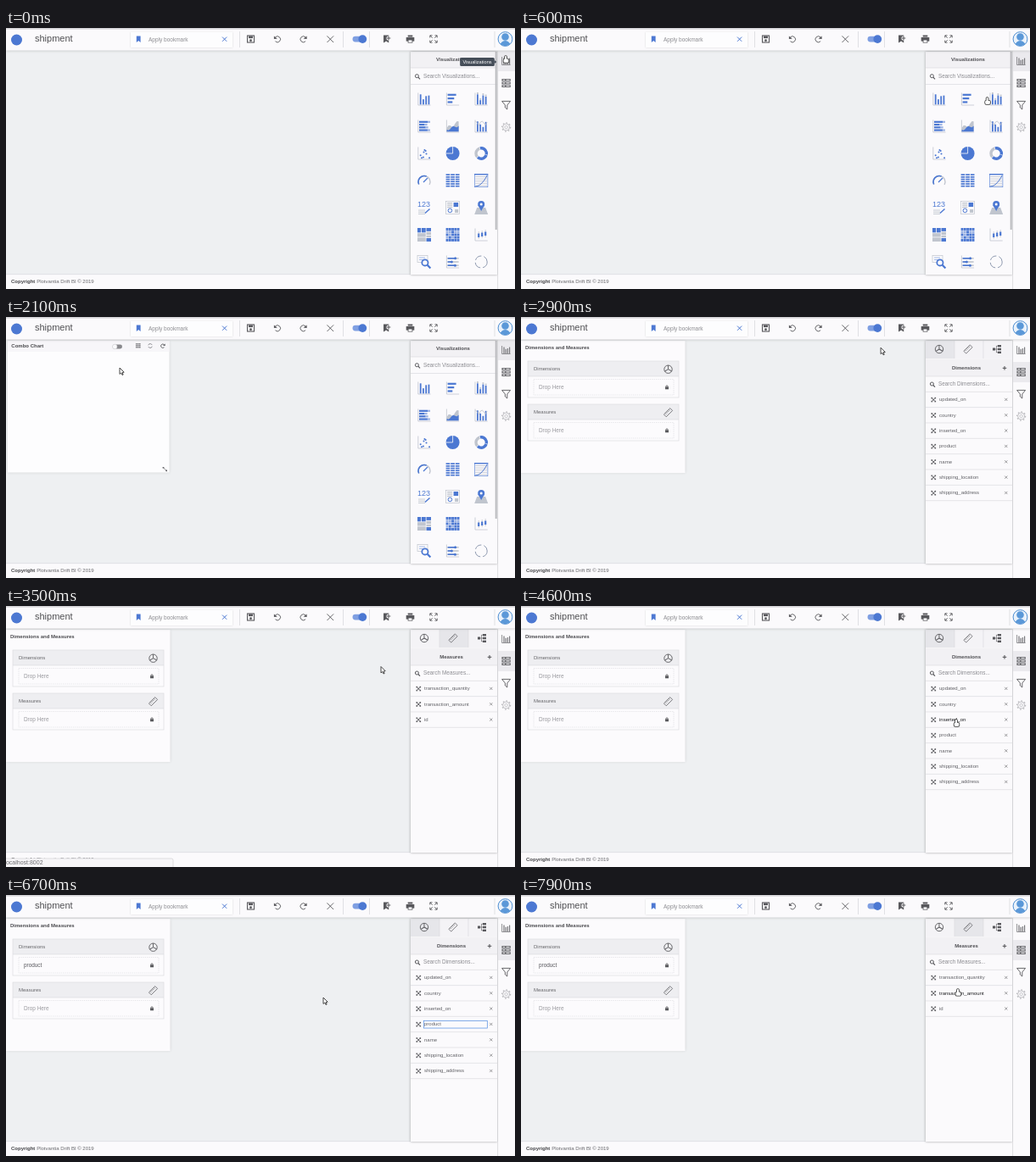
These frames come from a looping animation (600x308 px, 8 s). An HTML page with a canvas:

```html
<!DOCTYPE html>
<html lang="en">
<head>
<meta charset="utf-8">
<title>Dashboard builder</title>
<style>
html, body { margin: 0; width: 600px; height: 308px; overflow: hidden; background: #eef0f2; }
canvas { display: block; width: 600px; height: 308px; }
</style>
</head>
<body>
<canvas id="stage"></canvas>
<script>
const LOOP = 8000, STEP = 100, TAU = Math.PI * 2;
const BLUE = '#4c78d2', PALE = '#9db4e4', GREY = '#c0c5ce', DARK = '#58585c', PAPER = '#fbfafc', EDGE = '#dcdce0';
const FONT = '"Liberation Sans", Arial, sans-serif';
const canvas = document.getElementById('stage');
const g = canvas.getContext('2d');
const dpr = window.devicePixelRatio || 1;
canvas.width = 600 * dpr;
canvas.height = 308 * dpr;

// ---- drawing helpers ----
const each = (n, draw) => { for (let i = 0; i < n; i++) draw(i); };
const noise = n => { const v = Math.sin(n * 12.9898) * 43758.5453; return v - Math.floor(v); };

function rect(color, x, y, w, h) {
  g.fillStyle = color;
  g.fillRect(x, y, w, h);
}
function box(color, x, y, w, h, width = 0.7) {
  g.strokeStyle = color;
  g.lineWidth = width;
  g.strokeRect(x, y, w, h);
}
function dashed(pattern, draw) {
  g.setLineDash(pattern);
  draw();
  g.setLineDash([]);
}
function round(color, x, y, w, h, r) {
  g.fillStyle = color;
  g.beginPath();
  g.roundRect(x, y, w, h, r);
  g.fill();
}
function trace(pts) {
  g.beginPath();
  for (let i = 0; i < pts.length; i += 2) g.lineTo(pts[i], pts[i + 1]);
}
function line(color, width, ...pts) {
  trace(pts);
  g.strokeStyle = color;
  g.lineWidth = width;
  g.stroke();
}
function poly(color, ...pts) {
  trace(pts);
  g.closePath();
  g.fillStyle = color;
  g.fill();
}
function disc(color, x, y, r) {
  g.fillStyle = color;
  g.beginPath();
  g.arc(x, y, r, 0, TAU);
  g.fill();
}
function arc(color, width, x, y, r, from = 0, to = TAU) {
  g.strokeStyle = color;
  g.lineWidth = width;
  g.beginPath();
  g.arc(x, y, r, from, to);
  g.stroke();
}
function text(str, x, y, size, color, bold = false, align = 'left') {
  g.font = `${bold ? 'bold ' : ''}${size}px ${FONT}`;
  g.textAlign = align;
  g.fillStyle = color;
  g.fillText(str, x, y + size * 0.33);
}
function at(x, y, draw, turn = 0, flip = 1) {
  g.save();
  g.translate(x, y);
  g.rotate(turn);
  g.scale(flip, 1);
  draw();
  g.restore();
}
function shadow(color, blur, draw) {
  g.save();
  g.shadowColor = color;
  g.shadowBlur = blur * dpr;
  draw();
  g.restore();
}
function cross(color, x, y, r, w) {
  line(color, w, x - r, y - r, x + r, y + r);
  line(color, w, x + r, y - r, x - r, y + r);
}
const rule = (y, x = 477, end = 579) => line(EDGE, 0.7, x, y, end, y);

// ---- small icons ----
function wheel() {
  arc(DARK, 0.9, 0, 0, 4.7);
  each(3, i => at(0, 0, () => line(DARK, 0.9, 0, 0, 4.7, 0), 0.5 + i * TAU / 3));
}
function ruler() {
  box(DARK, -5.2, -2, 10.4, 4);
  each(4, i => line(DARK, 0.6, i * 2 - 3, -2, i * 2 - 3, 0));
}
function tree() {
  rect(DARK, -5, -1.5, 3, 3);
  line(DARK, 0.6, -0.5, -4, -0.5, 4);
  each(3, i => {
    rect(DARK, 1, i * 3.8 - 5, 4, 2.4);
    line(DARK, 0.6, -2 + (i !== 1) * 1.5, i * 3.8 - 3.8, 1, i * 3.8 - 3.8);
  });
}
function lens(color = DARK) {
  arc(color, 1, -0.6, -0.6, 2);
  line(color, 1.2, 0.9, 0.9, 3, 3);
}
function lock() {
  rect(DARK, -2, -0.4, 4, 3);
  arc(DARK, 0.8, 0, -0.5, 1.3, Math.PI, 0);
}
function turnArrow(r) {
  arc(DARK, 0.9, 0, 0, r, -2.4, 2.4);
  poly(DARK, -r - 0.6, -r - 0.4, -r - 0.6, -0.2, -0.2, -0.5);
}
function node() {
  cross(DARK, 0, 0, 1.9, 0.7);
  each(9, i => { if (i % 2 === 0) rect(DARK, i % 3 * 2 - 2.8, Math.floor(i / 3) * 2 - 2.8, 1.6, 1.6); });
}
function chartIcon() {
  line('#77777b', 0.8, -5, -5, -5, 4.5, 5, 4.5);
  each(4, i => { const h = 3.5 + 4 * wave(i, 1.1); rect('#77777b', i * 2.2 - 3.2, 4 - h, 1.2, h); });
}
function stackIcon() {
  each(3, i => {
    const y = i * 3.6 - 5;
    rect('#6c6c70', -5.2, y, 10.4, 2.8);
    rect(PAPER, -3.8, y + 0.9, 2.2, 0.9);
    rect(PAPER, 0, y + 0.9, 4, 0.9);
  });
}
function filterIcon() {
  line(DARK, 0.9, -5, -4.6, 5, -4.6, 1.2, 0, 1.2, 5, -1.2, 3, -1.2, 0, -5, -4.6);
}
function gearIcon() {
  arc('#bcbcc0', 0.9, 0, 0, 4);
  arc('#bcbcc0', 0.8, 0, 0, 1.7);
  dashed([1.6, 2.2], () => arc('#bcbcc0', 1.3, 0, 0, 5));
}

// ---- gallery icons, each about 16 px around its centre ----
const wave = (i, k) => Math.abs(Math.sin(1.6 + i * k));
const axes = () => line(GREY, 0.8, -7.2, -7.5, -7.2, 7, 7.5, 7);
function columns(n, k, cap) {
  axes();
  each(n, i => {
    const h = 3 + 9 * wave(i, k), x = i * 13 / n - 5.2;
    rect(BLUE, x, 6.3 - h, 1.8, h);
    if (cap) rect(GREY, x, 4 - h, 1.8, 2);
  });
}
function rows(n, k, tail) {
  axes();
  each(n, i => {
    const w = 4 + 6 * wave(i, k), y = i * 13 / n - 6.3;
    rect(BLUE, -6, y, w, 2.2);
    if (tail) rect(PALE, w - 6, y, 3, 2.2);
  });
}
function curve(f) {
  const pts = [];
  each(8, i => pts.push(i * 2 - 7, f(i)));
  return pts;
}
function split(x, y, w, h, seed) {
  if (seed > 7) return rect(noise(seed) < 0.6 ? BLUE : GREY, x, y, w - 0.8, h - 0.8);
  const part = 0.35 + 0.3 * noise(seed);
  const wide = w >= h;
  split(x, y, wide ? w * part : w, wide ? h : h * part, seed * 2);
  if (wide) split(x + w * part, y, w * (1 - part), h, seed * 2 + 1);
  else split(x, y + h * part, w, h * (1 - part), seed * 2 + 1);
}
const gallery = [
  () => columns(4, 1.9),
  () => rows(3, 2.2),
  () => columns(4, 1.3, true),
  () => rows(4, 1.1, true),
  () => {
    axes();
    poly(GREY, -7, 6.3, ...curve(i => 2 - i - 2 * Math.sin(i * 1.3)), 7, 6.3);
    poly(BLUE, -7, 6.3, ...curve(i => 4 - i * 0.7 + 1.5 * Math.sin(i * 1.3)), 7, 6.3);
  },
  () => { columns(4, 2.2); line(GREY, 0.9, ...curve(i => -1 - 5 * wave(i, 0.8))); },
  () => { axes(); each(8, i => disc(BLUE, noise(i + 1) * 12 - 5, noise(i + 30) * 12 - 6.5, 1)); },
  () => { disc(BLUE, 0, 0, 8); line(PAPER, 0.8, 0, -8, 0, 0, -8, 0); },
  () => each(3, i => arc(i ? BLUE : GREY, 3.4, 0, 0, 6.2, 2.4 + i * TAU / 3, 4.4 + i * TAU / 3)),
  () => { arc(GREY, 1.4, 0, 1.5, 7, 2.7, 6.8); arc(BLUE, 1.6, 0, 1.5, 7, 2.7, 5.1); line(BLUE, 1.2, -1, 2, 4, -3); },
  () => each(18, i => rect(BLUE, i % 3 * 5.6 - 8, Math.floor(i / 3) * 2.7 - 7.7, 4.7, 1.7)),
  () => {
    rect(BLUE, -8, -8, 16, 1.4);
    each(5, i => line(GREY, 0.8, -7, i * 2.6 - 4.5, 7, i * 2.6 - 4.5));
    line(BLUE, 1, ...curve(i => 7 - 13 * (i / 7) ** 2));
    box(BLUE, -7.7, -7.7, 15.4, 15.4, 0.6);
  },
  () => {
    text('123', -8, -4, 9, BLUE);
    each(3, i => line(GREY, 0.9, -7, 3 + i * 2.2, 1, 3 + i * 2.2));
    line(BLUE, 1.4, 1, 6.5, 6.5, 1.5);
  },
  () => {
    box(GREY, -8, -7.5, 16, 15);
    each(3, i => rect(GREY, -6.5, i * 2.4 - 6, 6, 1.3));
    rect(BLUE, 1, -6, 5.5, 5);
    rect(GREY, 2.5, 2, 4, 4);
    arc(BLUE, 1, -3.2, 3.4, 2.3);
  },
  () => {
    poly(GREY, -5, 0, 5, 0, 8, 8, -8, 8);
    poly(BLUE, -3.8, -3, 3.8, -3, 0, 4);
    disc(BLUE, 0, -4, 4);
    disc(PAPER, 0, -4, 1.5);
  },
  () => split(-8, -8, 16.8, 16.8, 1),
  () => each(25, i => rect(noise(i + 5) < 0.65 ? BLUE : PALE, i % 5 * 3.25 - 8, Math.floor(i / 5) * 3.25 - 8, 2.9, 2.9)),
  () => {
    axes();
    each(3, i => { line(GREY, 0.8, i * 4 - 3, -4 - i, i * 4 - 3, 5 - i); rect(BLUE, i * 4 - 4.1, -1.5 - i, 2.2, 4.5); });
  },
  () => {
    box(GREY, -8, -7.5, 12, 8);
    each(2, i => line(PALE, 0.9, -6, i * 2.5 - 5, 1, i * 2.5 - 5));
    at(2, 2, () => { g.scale(1.8, 1.8); disc(PAPER, -0.6, -0.6, 2); lens(BLUE); });
  },
  () => {
    axes();
    each(3, i => { const x = 5 * wave(i, 1.7) - 2; rect(GREY, -6, i * 4.2 - 5, 13, 1.6); rect(BLUE, -6, i * 4.2 - 5, x + 6, 1.6); disc(BLUE, x, i * 4.2 - 4.2, 1.5); });
  },
  () => dashed([9, 3], () => arc('#8f9ab0', 1, 0, 0, 7))
];

// ---- page parts ----
function topBar() {
  shadow('#00000030', 3, () => rect(PAPER, 0, 0, 600, 26.5));
  rect('#d4d3d7', 0, 0, 600, 1.6);
  disc(BLUE, 12.5, 14, 6.5);
  text('shipment', 34, 12.8, 11, '#4f4f52');
  shadow('#00000028', 2, () => rect('#fdfdfe', 147, 4.5, 120, 18.5));
  poly(BLUE, 153.8, 9.5, 158.6, 9.5, 158.6, 17, 156.2, 15, 153.8, 17);
  text('Apply bookmark', 168, 13.5, 6.5, '#8e8e92');
  cross(BLUE, 257.6, 13.2, 2.6, 1);
  for (const x of [275.5, 397.5, 428.5, 576]) line('#dadade', 0.8, x, 4, x, 23);
  at(288.5, 13, () => {
    box(DARK, -4, -4, 8, 8, 1.1);
    rect(DARK, -2.5, -3.5, 5, 2.6);
    disc(DARK, 0, 1.7, 1.4);
  });
  at(320, 13.3, () => turnArrow(3.5));
  at(350.5, 13.3, () => turnArrow(3.5), 0, -1);
  cross(DARK, 382.3, 13.2, 3.8, 0.9);
  round('#7f9fe2', 408.5, 9.7, 15, 6.8, 3.4);
  disc(BLUE, 420.3, 13.1, 4.9);
  at(449, 13, () => {
    poly(DARK, -4, -4.5, 2.2, -4.5, 2.2, 4.6, -0.9, 2.4, -4, 4.6);
    disc(PAPER, 2, -1, 2.6);
    each(2, i => at(2, -1, () => line(DARK, 1, -2.3, 0, 2.3, 0), i * TAU / 4));
  });
  at(476.5, 13, () => {
    rect(DARK, -2.8, -4.5, 5.6, 2);
    rect(DARK, -4.8, -2, 9.6, 4.6);
    box(DARK, -2.4, 0.9, 4.8, 3.2, 0.9);
    rect(PAPER, -1.9, 1.4, 3.8, 2.2);
  });
  each(4, k => at(504, 13, () => {
    line(DARK, 0.9, 1.3, -1.3, 4, -4);
    line(DARK, 0.9, 1.5, -4.2, 4.2, -4.2, 4.2, -1.5);
  }, k * TAU / 4));
  g.save();
  g.beginPath();
  g.arc(588.5, 13, 8.2, 0, TAU);
  g.clip();
  rect('#eaf2fb', 578, 3, 22, 22);
  disc('#5b98d8', 588.5, 10.5, 4.3);
  disc('#5b98d8', 588.5, 21.5, 6.4);
  g.restore();
  arc('#4f8fd2', 1, 588.5, 13, 8.4);
}

function sideBar(active) {
  rect(PAPER, 580, 27, 20, 281);
  line('#d6d6da', 0.8, 579.6, 27, 579.6, 308);
  rect('#ebeaee', 580, 27 + active * 26, 20, 24);
  [chartIcon, stackIcon, filterIcon, gearIcon].forEach((icon, i) => at(589.6, 39 + i * 26, icon));
}

function footer(status) {
  rect(PAPER, 0, 291, 580, 17);
  rule(290.6, 0, 580);
  text('Copyright', 6, 299, 6, '#47474a', true);
  text('Plotvantia Drift BI © 2019', 36.2, 299, 6, '#66666a');
  if (!status) return;
  round('#f7f6f8', -4, 298, 201, 14, 2);
  g.strokeStyle = '#d2d2d5';
  g.lineWidth = 0.7;
  g.stroke();
  text('localhost:8002', -1.6, 303, 7, '#6c6c70');
}

function panelBase(hint, y) {
  shadow('#00000055', 3, () => rect(PAPER, 477, 28, 102, 263));
  at(485, y + 0.3, lens.bind(null, DARK));
  text(`Search ${hint}...`, 492, y, 6.4, '#8c8c91');
}
function panelTitle(title, x, y, top, h) {
  rect('#f2f1f4', 477, top, 102, h);
  rule(top + h);
  text(title, x, y, 6, '#505054', true, 'center');
}

const galleryX = i => 493 + i % 3 * 33.6;
const galleryY = i => 84 + Math.floor(i / 3) * 32;
function galleryPanel() {
  panelBase('Visualizations', 57);
  panelTitle('Visualizations', 527, 37.2, 28, 19);
  rule(66.5);
  gallery.forEach((icon, i) => at(galleryX(i), galleryY(i), icon));
  rect('#bababe', 576.7, 28, 2, 210);
}

const fields = {
  Dimensions: ['updated_on', 'country', 'inserted_on', 'product', 'name', 'shipping_location', 'shipping_address'],
  Measures: ['transaction_quantity', 'transaction_amount', 'id']
};
const rowY = i => 97.4 + i * 18.35;
const tabX = i => 493 + i * 34;
const drawTab = [wheel, ruler, tree];

function fieldPanel(kind, cur, focus) {
  panelBase(kind, 79.3);
  rect('#f4f3f6', 477, 28, 102, 21);
  rect('#e6e6ea', kind === 'Dimensions' ? 477 : 511, 28, 34, 21);
  drawTab.forEach((icon, i) => {
    if (i) line(EDGE, 0.7, tabX(i) - 16, 28, tabX(i) - 16, 49);
    at(tabX(i), 38, icon, i === 1 ? -0.78 : 0);
  });
  panelTitle(kind, 525, 60, 49.5, 20.5);
  each(2, i => at(570, 60.3, () => line(DARK, 1.1, -2.3, 0, 2.3, 0), i * TAU / 4));
  rule(88.3);
  fields[kind].forEach((name, i) => {
    const y = rowY(i);
    const hover = cur.hand && Math.abs(cur.y + 2 - y) < 8;
    at(486.3, y + 0.2, node);
    text(name, 493, y, 6, hover ? '#1f1f22' : '#626267');
    cross('#747478', 571.8, y, 1.6, 0.7);
    rule(y + 9.2);
  });
  if (focus) box('#4f8be0', 492.3, rowY(3) - 4, 75, 8.6);
}

function chartCard() {
  shadow('#00000018', 3, () => rect('#fdfdfe', 2, 28, 190.5, 155.5));
  rect('#f7f6f9', 2, 28, 190.5, 13);
  text('Combo Chart', 6.3, 34.4, 6, '#4a4a4d', true);
  round('#88888c', 128, 32.6, 9, 4.8, 2.4);
  disc('#fafafc', 128.2, 35, 2.8);
  arc('#c6c6ca', 0.6, 128.2, 35, 2.8);
  each(9, i => rect('#77777b', 153 + i % 3 * 2, 31 + Math.floor(i / 3) * 2, 1.5, 1.5));
  each(2, i => arc('#77777b', 0.8, 170, 34, 2.4, 0.3 + i * Math.PI, 2.7 + i * Math.PI));
  at(184.8, 34.2, () => turnArrow(2.2), 0, -1);
  each(2, i => at(187.3, 179.6, () => { line(DARK, 0.8, 0, 0, 2, 2); poly(DARK, 2.7, 2.7, 0.5, 2.4, 2.4, 0.5); }, i * Math.PI));
}

function fieldCard(dimension) {
  shadow('#00000018', 3, () => rect('#fcfbfd', 0, 28, 193.5, 156));
  text('Dimensions and Measures', 5, 36, 6, '#4a4a4e', true);
  Object.keys(fields).forEach((name, i) => {
    const y = 52 + i * 51, value = i ? null : dimension;
    rect('#eeeef1', 8, y, 178, 18);
    box(EDGE, 8, y, 178, 43);
    rule(y + 18, 8, 186);
    text(name, 15, y + 9, 6, '#66666a');
    at(173.5, y + 9.7, drawTab[i], i * -0.78);
    dashed([1.2, 1.2], () => box(EDGE, 15, y + 21.5, 165, 18.5));
    text(value || 'Drop Here', 21, y + 30.7, 6.4, value ? '#58585d' : '#9a9a9f');
    at(172, y + 30.7, lock);
  });
}

function tooltip(label, cx, y, alpha, side) {
  g.save();
  g.globalAlpha = alpha;
  g.font = `5.6px ${FONT}`;
  const w = g.measureText(label).width + 6.6;
  const x = Math.min(cx, 576 - w / 2);
  round('#454d58', x - w / 2, y - 5, w, 10, 1.6);
  if (side) at(x + w / 2, y, () => poly('#454d58', 0, -2, 2.5, 0, 0, 2));
  else at(cx, y + 5, () => poly('#454d58', -2, 0, 0, 2.4, 2, 0));
  text(label, x, y, 5.6, '#fff', false, 'center');
  g.restore();
}

// ---- pointer: [start, end, x, y] of each glide, resting in between ----
const glides = [
  [200, 900, 524, 114],
  [900, 1200, 557, 121],
  [1500, 2100, 134, 60],
  [2100, 2350, 130, 34],
  [2500, 3100, tabX(1), 37],
  [3250, 3750, 357, 106],
  [3850, 4150, tabX(0), 37],
  [4300, 4600, 513, rowY(2)],
  [4650, 5000, 507, rowY(3)],
  [5700, 6400, 76, 82],
  [6500, 6700, 374, 121],
  [6700, 7050, tabX(1), 37],
  [7500, 7900, 515, 111]
];
const ease = u => u * u * (3 - 2 * u);

function pointer(t) {
  let x = 589, y = 33;
  for (const [from, to, tx, ty] of glides) {
    const u = ease(Math.min(1, Math.max(0, (t - from) / (to - from))));
    x += (tx - x) * u;
    y += (ty - y) * u;
  }
  const dragging = t >= 5700 && t < 6500;
  return { x, y, dragging, hand: x > 482 || dragging || (x < 132 && y < 40) };
}
function drawHand() {
  const shape = (color, grow) => {
    round(color, -1 - grow, -grow, 2 + grow * 2, 6 + grow * 2, 1 + grow);
    round(color, -2.4 - grow, 3.6 - grow, 5.8 + grow * 2, 4.2 + grow * 2, 1.4 + grow);
  };
  shape('#333', 0.8);
  shape('#fff', 0);
}
function drawArrow() {
  g.lineJoin = 'round';
  poly('#fff', 0, 0, 0, 7.4, 1.8, 6, 3, 8.5, 4.2, 8, 3, 5.5, 5.2, 5.2);
  g.closePath();
  g.strokeStyle = '#333';
  g.lineWidth = 0.9;
  g.stroke();
}

function render(t) {
  const within = (a, b) => t >= a && t < b;
  const cur = pointer(t);
  const editing = t >= 2400;
  g.setTransform(dpr, 0, 0, dpr, 0, 0);
  rect('#eef0f2', 0, 0, 600, 308);
  if (editing) fieldCard(t >= 6500 ? 'product' : null);
  else if (t >= 1600) chartCard();
  footer(within(1000, 2000) || within(3100, 3800) || within(4100, 4500));
  if (editing) fieldPanel(within(3200, 4200) || t >= 7500 ? 'Measures' : 'Dimensions', cur, within(5700, 7400));
  else galleryPanel();
  sideBar(Number(editing));
  topBar();

  if (t < 400) tooltip('Visualizations', 555.5, 40, 1, true);
  if (within(1100, 1600)) tooltip('Combo Chart', galleryX(5), 94, t < 1200 ? 0.1 : 1);
  if (within(900, 1200)) tooltip('Line Chart', galleryX(4), 94, t < 1100 ? 1 : 0.85);
  if (cur.dragging) {
    g.globalAlpha = 0.55;
    text('product', cur.x - 14, cur.y + 1.5, 6, DARK);
    g.globalAlpha = 1;
  }
  at(cur.x, cur.y, cur.hand ? drawHand : drawArrow);
}

function tick() {
  const t = performance.now() % LOOP;
  render(Math.floor(t / STEP) * STEP);
  requestAnimationFrame(tick);
}
tick();
</script>
</body>
</html>
```
